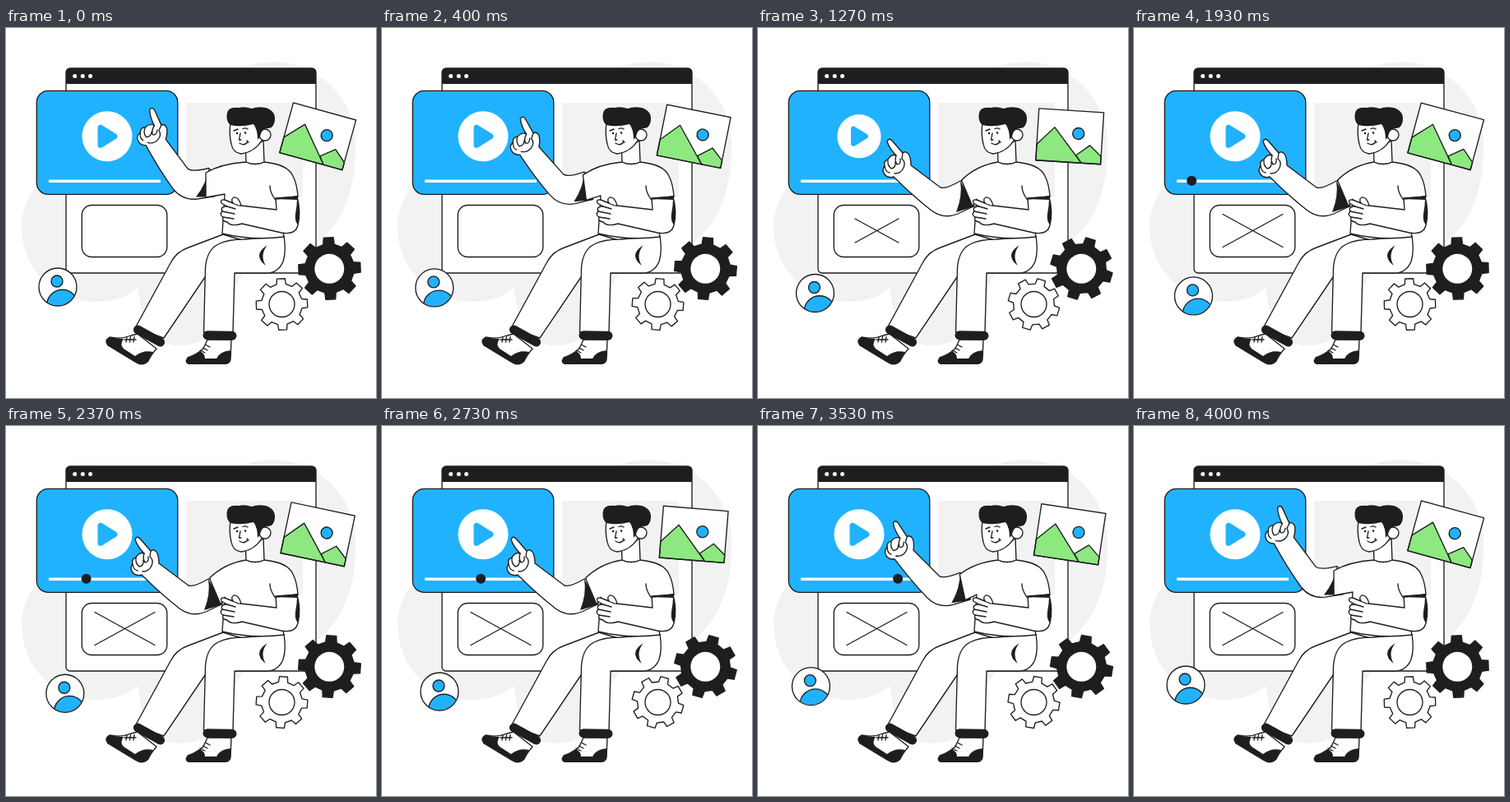
These frames come from a looping animation (450x450 px, 4.03 s). An HTML page:

```html
<!DOCTYPE html>
<html lang="en">
<head>
<meta charset="utf-8">
<title>Video tutorial</title>
<style>
  html, body { margin: 0; width: 100%; height: 100%; overflow: hidden; background: #fff; }
  svg { display: block; width: 100vw; height: 100vh; }
  .line { fill: none; stroke: #1c1e1f; stroke-width: 1.35; stroke-linecap: round; stroke-linejoin: round; }
  .white { fill: #fff; }
  .blue { fill: #20b2ff; }
  .green { fill: #8de87f; }
  .dark { fill: #1c1e1f; }
</style>
</head>
<body>
<svg viewBox="0 0 450 450">
  <path fill="#f2f2f2" d="M286 49A100 100 0 0 1 425 141C426 200 408 238 377 262C320 280 285 290 278 320C270 360 250 386 210 386C175 386 165 350 160 316C146 328 130 333 110 333C55 333 19 290 19 240C19 200 55 165 110 150C190 110 220 70 286 49Z"/>

  <g id="browser">
    <rect class="line white" x="73" y="49" width="304" height="249" rx="5"/>
    <path class="dark" d="M73 68V54Q73 49 78 49H372Q377 49 377 54V68Z"/>
    <g class="white"><circle cx="83.700" cy="58.500" r="2.500"/><circle cx="93.300" cy="58.500" r="2.500"/><circle cx="102.600" cy="58.500" r="2.500"/></g>
    <rect fill="#f2f2f2" x="219" y="91" width="142" height="114"/>
  </g>

  <g id="video">
    <rect class="line blue" x="37.300" y="76.300" width="171.500" height="126" rx="14"/>
    <g id="play">
      <circle class="white" r="30.500"/>
      <path class="blue" stroke="#20b2ff" stroke-width="7" stroke-linejoin="round" d="M-8 -10.500V10.500L9 0Z"/>
    </g>
    <path d="M52 186.300H188" stroke="#fff" stroke-width="3.500"/>
    <circle id="knob" class="dark" cy="185.800" r="6"/>
  </g>

  <rect class="line white" x="92.300" y="215.500" width="103.500" height="63" rx="12"/>
  <path id="cross" class="line"/>

  <g id="avatar">
    <clipPath id="badge"><circle r="22.500"/></clipPath>
    <circle class="white" r="23"/>
    <circle class="line blue" clip-path="url(#badge)" cx="5.500" cy="22" r="18.800"/>
    <circle class="line blue" cx="-1" cy="-7" r="7"/>
    <circle class="line" r="23"/>
  </g>

  <g id="photo">
    <path class="white" d="M-39.500 -31.500H39.500V31.500H-39.500Z"/>
    <path class="line green" d="M-39.500 12L-19 -10L16 31.500H-39.500Z"/>
    <path class="line green" d="M9 22.500L25 9.500L39.500 22V31.500H16Z"/>
    <circle class="line blue" cx="10.300" cy="-4" r="7"/>
    <path class="line" d="M-39.500 -31.500H39.500V31.500H-39.500Z"/>
  </g>

  <g id="legs">
    <path class="line white" d="M160 372L183 390Q176 398 173 405Q166 412 157 406L124 386Q119 380 126 376Q140 379 152 374Z"/>
    <path class="dark" d="M126 376Q135 378 143 378Q138 385 143 390L157 399Q167 391 179 394Q176 398 173 405Q166 412 157 406L124 386Q119 380 126 376Z"/>
    <path class="line" d="M144 379H158M147 376L146 382M151.500 375.500L150.500 382M156 375.500L155 382"/>
    <path class="line white" d="M245 379H274L273 403Q272 408 266 408H222Q217 407 221 401Q232 397 240 390Z"/>
    <path class="dark" d="M221 401Q230 398 236 393Q242 396 242 402H256Q260 393 274 392L273 403Q272 409 266 409H222Q217 407 221 401Z"/>
    <path class="line" d="M236 392L242 395M239.500 389L245 392M242.500 385L248 388"/>
    <path class="line white" d="M157 365L200 286Q207 272 222 267L264 251L300 262L242 303L192 377Z"/>
    <path class="line white" d="M240.500 370L242.500 292Q244 270 258 263Q269 257 290 257L338 253Q341 272 337 284Q331 298 317 298H278L276 370Z"/>
    <path class="dark" d="M318 264Q299 276 316 289Q308 276 318 264Z"/>
    <rect class="dark" x="-21" y="-5.500" width="42" height="11" rx="5.500" transform="translate(174 374.500) rotate(29)"/>
    <rect class="dark" x="-20.500" y="-5.500" width="41" height="11" rx="5.500" transform="translate(260 374) rotate(1)"/>
  </g>

  <g id="arm">
    <path class="line white" d="M246 186Q229 196 222 194L186 167Q186 158 183 153Q179 149 176 152L163 137Q159 133 157 138Q160 147 168 155Q162 153 158 160Q152 162 154 168Q150 173 154 178Q158 183 165 181Q188 204 211 222Q226 233 243 226L262 217L268 195Z"/>
    <path class="line" d="M168 155Q166 161 169 166Q174 166 173 159M158 160Q157 167 162 171Q168 170 167 163M154 168Q155 175 160 176M176 152L175 159Q180 163 177 170Q174 177 166 177"/>
    <path class="dark" d="M246 186Q249 204 241 224L264 217Z"/>
  </g>

  <g id="torso">
    <path id="shirt" class="line white"/>
    <path class="line white" d="M328 207L329 221L286 216Q283 205 277 206Q273 208 276 213L266 209Q260 208 262 213L269 217Q260 217 263 223Q259 227 264 230Q262 235 269 236Q274 242 287 238L335 249Q352 252 355 240Q359 224 354 205Z"/>
    <path class="line" d="M276 213Q284 217 286 216M269 217L279 220M263 223L278 226M264 230L277 232"/>
    <path class="dark" d="M328 208L355 205V209ZM354 207Q359 222 355 239Q351 236 352 226Q354 216 354 207Z"/>
    <path class="line" d="M328 208L355 205M327 208Q321 200 321 192"/>
  </g>

  <g id="head">
    <path class="line white" d="M291.500 150L292 163Q303 168 314 163L313 137Z"/>
    <path class="line white" d="M273 115Q271 129 274 141Q276 152 286 153Q302 151 311 137L315 108Z"/>
    <circle class="line white" cx="315" cy="130" r="7"/>
    <path class="dark" d="M268.500 106Q269 95 283 97Q290 95 299 98Q306 95 316 97Q328 101 327 112Q326 122 318 122Q311 122 309 132L306 136Q306 123 301 117Q285 121 273 118Q268 114 268.500 106Z"/>
    <g class="dark"><circle cx="281" cy="128" r="1.300"/><circle cx="291" cy="127.500" r="1.300"/></g>
    <path class="line" d="M277 125L282 123M288 122.500Q291 121 294 123M285 128L283.500 136H286M284 140Q290 144 294 138.500M293 137L295 139"/>
  </g>

  <path id="whiteGear" class="line white"/>
  <circle class="line white" cx="335.500" cy="336" r="15.500"/>
  <path id="darkGear" class="line dark"/>
  <circle class="white" cx="393.300" cy="292.800" r="18"/>
</svg>

<script>
  const LOOP = 4030, DELAY = 33;
  const el = id => document.getElementById(id);
  const place = (id, x, y, rest = '') => el(id).setAttribute('transform', `translate(${x} ${y}) ${rest}`);
  const clamp = v => Math.min(1, Math.max(0, v));
  const ease = (t, from, to) => (1 - Math.cos(Math.PI * clamp((t - from) / (to - from)))) / 2;
  const mix = (a, b, k) => a + (b - a) * k;

  function gearPath(outer, root) {
    const points = [];
    for (let tooth = 0; tooth < 8; tooth++) {
      for (const [radius, offset] of [[root, -13], [outer, -9], [outer, 9], [root, 13]]) {
        const a = (tooth * 45 + offset) * Math.PI / 180;
        points.push(`${(radius * Math.cos(a)).toFixed(2)} ${(radius * Math.sin(a)).toFixed(2)}`);
      }
    }
    return `M${points.join('L')}Z`;
  }
  el('whiteGear').setAttribute('d', gearPath(31.5, 25));
  el('darkGear').setAttribute('d', gearPath(38, 30));

  // k: 0 = arm raised, 1 = arm pointing at the player
  function shirtPath(k) {
    const cuffX = mix(243, 247.5, k), cuffY = mix(176, 185, k);
    const hemX = mix(243, 261, k), hemY = mix(206, 217, k);
    return `M292 163Q${mix(262, 266, k)} ${mix(165, 167, k)} ${cuffX} ${cuffY}` +
      `L${hemX} ${hemY}L266 ${mix(202, 208, k)}L263 250Q300 259 338 254L328 208L355 205` +
      `Q354 190 349 180Q343 166 314 163Q303 168 292 163Z`;
  }

  function draw(time) {
    const t = Math.max(0, time - DELAY);
    const swing = (1 - Math.cos(Math.PI * t / 1000)) / 2;
    const drift = (1 - Math.cos(Math.PI * t / 2000)) / 2;

    place('photo', 379.2, 131.8, `rotate(${15.4 - 13.6 * swing})`);
    place('avatar', mix(63, 72.5, drift), mix(315, 326, drift));
    place('darkGear', 393.5, 292.5, `rotate(${-2 + 22 * swing})`);
    place('whiteGear', 335.5, 336, `rotate(${22 * swing - 2})`);

    const point = ease(t, 0, 1000) - ease(t, 3000, 4000);
    el('arm').setAttribute('transform', `rotate(${16.4 * (1 - point)} 300 180)`);
    el('shirt').setAttribute('d', shirtPath(point));

    const press = Math.sin(Math.PI * clamp((t - 1000) / 400)) ** 2;
    place('play', 123, 131.7, `scale(${1 - 0.14 * press})`);

    const grow = ease(t, 1000, 1367), w = 36.5 * grow, h = 20 * grow;
    el('cross').setAttribute('d', grow ? `M${144.5 - w} ${246.5 - h}l${2 * w} ${2 * h}m0 ${-2 * h}l${-2 * w} ${2 * h}` : '');

    el('knob').setAttribute('cx', 51.5 + 0.0625 * (t - 1600));
    el('knob').setAttribute('visibility', t >= 1600 && t < 3800 ? 'visible' : 'hidden');
  }

  const start = performance.now();
  function tick() {
    draw((performance.now() - start) % LOOP);
    requestAnimationFrame(tick);
  }
  tick();
</script>
</body>
</html>
```
